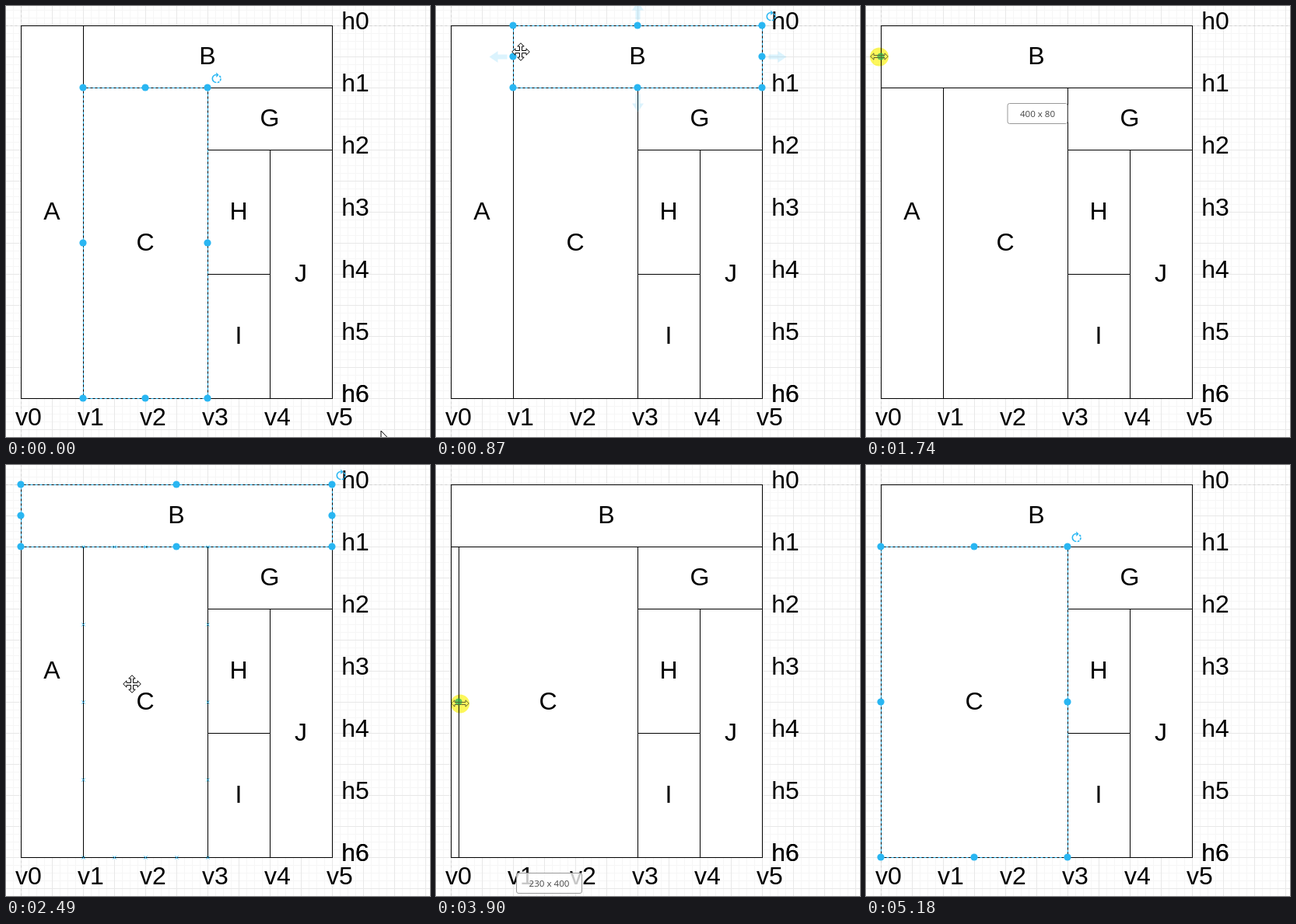
Animation of 545 by 555 pixels, one loop 5520 ms. Source, as an HTML page:

```html
<!DOCTYPE html>
<html lang="en">
<head>
<meta charset="utf-8">
<title>Resizing cells</title>
<style>
  html, body { margin: 0; width: 100%; height: 100%; overflow: hidden; background: #fff; }
  svg { display: block; width: 545px; height: 555px; }
  text { text-anchor: middle; font: 32px "Liberation Sans", Arial, sans-serif; }
  .tip { font: 11.6px "Open Sans", sans-serif; fill: #444; }
  .cell { fill: #fff; stroke: #000; }
  .dash { fill: none; stroke: #29b6f2; stroke-dasharray: 3 3; }
  .blue { fill: #29b6f2; }
  .line { fill: none; stroke: #29b6f2; }
  .pointer { fill: #fff; stroke: #000; }
  .pressed { fill: none; stroke: #666633; }
</style>
</head>
<body>
<svg viewBox="0 0 545 555">
  <g transform="translate(.5 .5)"><g id="back"></g><g id="scene"></g></g>
</svg>
<script>
const LOOP = 5520, STEP = 67.4, UNIT = 80, LEFT = 19, TOP = 25;
const col = i => LEFT + i * UNIT;
const row = i => TOP + i * UNIT;
const times = (n, make) => Array.from({ length: n }, (_, i) => make(i)).join('');

const dragB = { from: 1270, to: 2150 }, dragC = { from: 3160, to: 4510 };
const during = (t, { from, to }) => t >= from && t < to;

// Pointer moves: start, end and destination
const moves = [
  { from: 70, to: 600, x: 127, y: 55 },
  { from: 660, to: 1070, x: 100, y: 61 },
  { from: 1270, to: 1740, x: 17, y: 65 },
  { from: 2150, to: 2490, x: 162, y: 282 },
  { from: 2550, to: 2690, x: 139, y: 291 },
  { from: 2750, to: 3020, x: 109, y: 304 },
  { from: 3160, to: 3700, x: 33, y: 306 },
  { from: 3770, to: 3900, x: 31, y: 307 },
  { from: 4100, to: 4240, x: 25, y: 307 },
  { from: 4510, to: 5050, x: 472, y: 545 }
];

// Every move eases out in whole steps
function pointerAt(t) {
  let x = 482, y = 547;
  for (const m of moves) {
    if (t < m.from) break;
    const count = Math.round((m.to - m.from) / STEP) + 1;
    const step = Math.min(count, Math.floor((t - m.from + 6) / STEP) + 1);
    const k = 1 - (1 - step / count) ** 1.3;
    x += (m.x - x) * k;
    y += (m.y - y) * k;
    if (step < count) break;
  }
  return { x, y };
}

const midX = c => (c.x + c.r) / 2;
const midY = c => (c.y + c.b) / 2;
const label = (s, x, y) => `<text x="${x - .5}" y="${y + 9.5}">${s}</text>`;
const dot = (x, y, opacity = 1) =>
  `<circle class="blue" cx="${x - .5}" cy="${y - .5}" r="4.6" opacity="${opacity}"/>`;
const rect = (c, cls) =>
  `<rect class="${cls}" x="${c.x}" y="${c.y}" width="${c.r - c.x}" height="${c.b - c.y}"/>`;

// Points around a border, n intervals per side
function border(c, n) {
  const points = [];
  for (let i = 0; i <= n; i++)
    for (let j = 0; j <= n; j++)
      if (i % n === 0 || j % n === 0)
        points.push([c.x + (c.r - c.x) * i / n, c.y + (c.b - c.y) * j / n]);
  return points;
}

function selection(c) {
  const rotate = `<g transform="translate(${c.r + 11.5} ${c.y - 12})" stroke-width="1.6">
    <path class="line" d="M-.7 5A5 5 0 0 1 -.7 -5"/>
    <path class="line" d="M3.3 -3.7A5 5 0 0 1 .7 5" stroke-dasharray="3 1.2"/>
    <path class="blue" d="M-.7 -8V-1.6L2.5 -4.8Z"/></g>`;
  return rect(c, 'dash') + border(c, 2).map(p => dot(...p)).join('') + rotate;
}

function connectArrows(c) {
  return times(4, i => {
    const turn = i * Math.PI / 2;
    const x = midX(c) + Math.cos(turn) * (c.r - c.x) / 2;
    const y = midY(c) + Math.sin(turn) * (c.b - c.y) / 2;
    return `<path class="blue" opacity=".17" d="M8 -3H20V-7.5L31 0L20 7.5V3H8Z"
      transform="translate(${x} ${y}) rotate(${i * 90})"/>`;
  });
}

const connectPoints = c => border(c, 4).map(([x, y]) =>
  `<path class="line" d="M${x - 2} ${y - 2}l4 4m0 -4l-4 4"/>`).join('');

function tooltip(c) {
  const s = `${c.r - c.x} x ${c.b - c.y}`, w = s.length * 7 + 21, x = midX(c) + 1;
  return `<rect x="${x - w / 2}" y="${c.b + 20}" width="${w}" height="26" rx="2.5"
    fill="#fff" fill-opacity=".78" stroke="#999"/>
    <text class="tip" x="${x}" y="${c.b + 37.5}">${s}</text>`;
}

// Outline of n arrows leaving one centre
function arrowStar(n) {
  const arm = [[1.5, -1.5], [7, -1.5], [7, -4.2], [11.3, 0], [7, 4.2], [7, 1.5], [1.5, 1.5]];
  let d = '';
  for (let i = 0; i < n; i++) {
    const cos = Math.cos(i * 2 * Math.PI / n), sin = Math.sin(i * 2 * Math.PI / n);
    for (const [x, y] of arm) d += `${d ? 'L' : 'M'}${x * cos - y * sin} ${x * sin + y * cos}`;
  }
  return d + 'Z';
}

const pointers = {
  arrow: 'M0 0V16.5L3.8 13L6.3 18.8L8.8 17.7L6.3 12H11.5Z',
  resize: arrowStar(2),
  move: arrowStar(4)
};

function layout(bLeft, cLeft) {
  const cell = (name, v0, v1, h0, h1) =>
    ({ name, x: col(v0), r: col(v1), y: row(h0), b: row(h1) });
  return [
    cell('A', 0, 1, 0, 6), cell('B', bLeft, 5, 0, 1), cell('C', cLeft, 3, 1, 6),
    cell('G', 3, 5, 1, 2), cell('H', 3, 4, 2, 4), cell('I', 3, 4, 4, 6), cell('J', 4, 5, 2, 6)
  ];
}

function draw(t) {
  const p = pointerAt(t);
  const dragging = during(t, dragB) || during(t, dragC);

  // The dragged edge trails the pointer by one step and snaps to eighths of a column
  const eighths = Math.round((pointerAt(t - STEP).x - LEFT - 3.5) / 10);
  const snapped = Math.max(0, Math.min(8, eighths)) / 8;
  const edge = drag => t < drag.from ? 1 : t < drag.to ? snapped : 0;
  const cells = layout(edge(dragB), edge(dragC));
  const chosen = cells[during(t, { from: 530, to: 2615 }) ? 1 : 2];
  const over = cells.filter(c => p.x > c.x && p.x < c.r && p.y > c.y && p.y < c.b).pop();
  const visible = t < 5180;

  let out = cells.map(c => rect(c, 'cell') + label(c.name, midX(c), midY(c))).join('');
  if (dragging) {
    out += dot(chosen.x, midY(chosen), .75) + tooltip(chosen);
    out += `<circle cx="${p.x - .5}" cy="${p.y}" r="12" fill="#fdf75a"
      style="mix-blend-mode:multiply"/>`;
  } else {
    if (visible && over && over !== chosen) out += connectPoints(over);
    if (over === chosen && chosen.name === 'B' && t >= 660) out += connectArrows(chosen);
    out += selection(chosen);
  }

  if (visible) {
    const onHandle = Math.hypot(p.x - chosen.x, p.y - midY(chosen)) < 11;
    const kind = dragging || onHandle ? 'resize' : over ? 'move' : 'arrow';
    out += `<path class="${dragging ? 'pressed' : 'pointer'}" d="${pointers[kind]}"
      transform="translate(${p.x - .5} ${p.y - .5})"/>`;
  }
  document.getElementById('scene').innerHTML = out;
}

function drawBack() {
  const grid = (gap, color) => `<path stroke="${color}" d="${times(
    Math.ceil(600 / gap), i => {
      const at = (i - 1) * gap;
      return `M${LEFT % gap + at} -1V556M-1 ${TOP % gap + at}H546`;
    })}"/>`;
  document.getElementById('back').innerHTML =
    grid(10, '#f6f6f6') + grid(40, '#e8e8e8') +
    `<path d="M${LEFT} -1V556M-1 ${TOP}H546" stroke="#d2d2d2" stroke-dasharray="3 3"/>` +
    times(6, i => label('v' + i, col(i) + 10, 530)) +
    times(7, i => label('h' + i, 449, row(i) - 5)) +
    label('h6', 449, row(6) - 5);
}

drawBack();
const begin = performance.now();
function tick() {
  draw((performance.now() - begin) % LOOP);
  requestAnimationFrame(tick);
}
tick();
</script>
</body>
</html>
```
